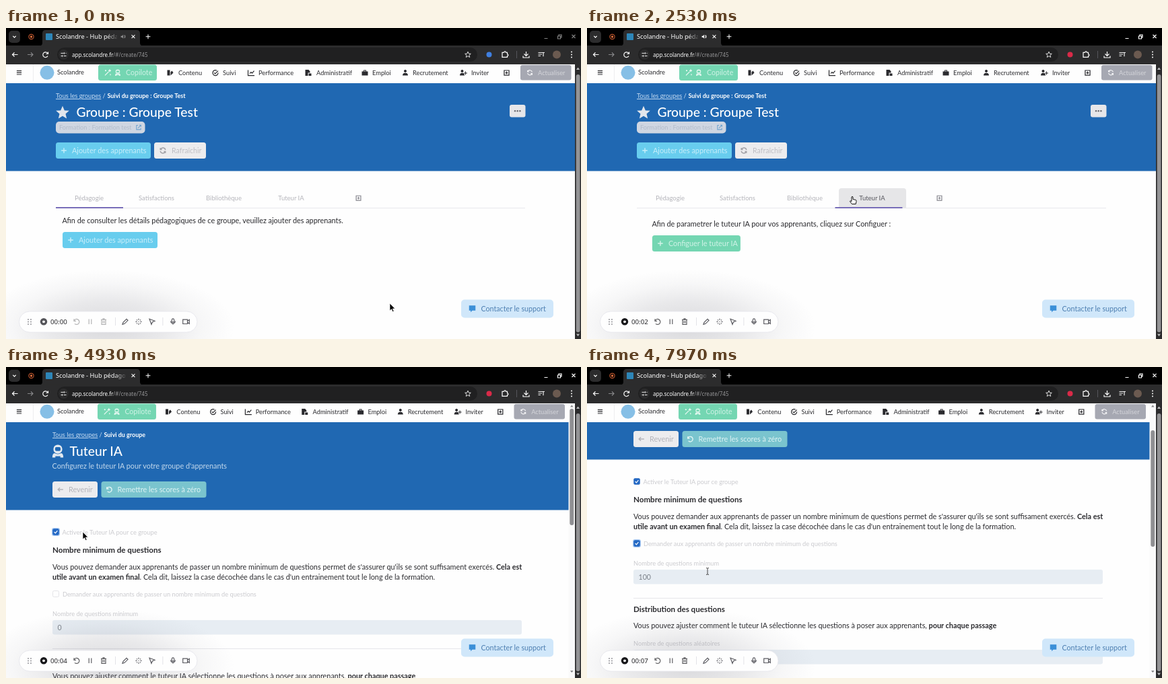
An HTML page for the animation above (8 s loop, 854 by 462 pixels).

```html
<!DOCTYPE html>
<html lang="fr">
<head>
<meta charset="utf-8">
<title>Tuteur IA</title>
<style>
html, body { margin: 0; width: 100%; height: 100%; overflow: hidden; background: #fefefe; }
svg { display: block; width: 100%; height: 100%; font-family: Lato, sans-serif; }
.ui { font-family: "Noto Sans", sans-serif; }
text { white-space: pre; }
.b { font-weight: 700; }
</style>
</head>
<body>
<svg id="stage" viewBox="0 0 854 462" preserveAspectRatio="none"></svg>
<script>
const LOOP = 8000;
const BRAND = 'Scolandre';
const INK = '#2a2a2e', BLUE = '#2068b2', PAGE = '#fefefe', DARK = '#2c2c2d';
const SKY = '#68cdee', GREEN = '#74d6b2', LIGHT = '#ececee', FAINT = '#cbcbcf', TAB = '#b4b4ba', TOOL = '#5a5a60';

// Icons are drawn around their own centre; a leading "!" means filled.
const ICONS = {
  plus: 'M-4 0H4M0-4V4',
  cross: 'M-2.7-2.7 2.7 2.7M2.7-2.7-2.7 2.7',
  check: 'M-4 0-1 3 4-3',
  back: 'M4 0H-4M-1-3-4 0-1 3',
  next: 'M-4 0H4M1-3 4 0 1 3',
  chevron: 'M-2-1 0 1 2-1',
  refresh: 'M4-1A4 4 0 0 0-3.5-2M-4-4v2.5h2.5M-4 1A4 4 0 0 0 3.5 2M4 4V1.5H1.5',
  undo: 'M-4-1A4 4 0 1 1-3 3M-4-4V-1H-1',
  reload: 'M3.7-1A3.8 3.8 0 1 0 3.5 2M4-4V-1H1',
  menu: 'M-4-3H4M-4 0H4M-4 3H4',
  tune: 'M-4-2H0M3-2H4M-4 2H-3M0 2H4M1-3.3v2.6M-2 .7v2.6',
  user: '!M0-4.5a2 2 0 1 1-.01 0M-4 4a4 3.8 0 0 1 8 0z',
  adduser: '!M-1.5-4.5a2 2 0 1 1-.01 0M-5 4a3.5 3.8 0 0 1 7 0zM3-2h1v2h2v1H4v2H3V1H1V0h2z',
  chart: 'M-4.5-4V4H5M-2 1 0-1 1.5.5 4.5-3',
  brief: '!M-4.5-2H-2V-4H2V-2H4.5V4H-4.5zM-1-2H1V-3H-1z',
  layers: '!M-4-4H0V4H-4zM1-1 3-3 5 0 1 4z',
  doc: '!M-4-4.5H1L3-2V0H0V4.5H-4zM1 1H5V4.5H1z',
  square: 'M-3.6-3.6h7.2v7.2h-7.2zM0-2V2M-2 0H2',
  tick: 'M4 0A4 4 0 1 1 2-3.4M-2-.3-.3 1.4 4-3',
  puzzle: 'M-4-3h2.6a1.4 1.4 0 0 1 2.8 0H3.5V-.5a1.4 1.4 0 0 1 0 2.8V4H-4z',
  down: 'M0-4.5V1.5M-3-1 0 2 3-1M-4.5 2v2.5h9V2',
  list: 'M-4.5-3H3M-4.5-.5H1M-4.5 2H-1M3 2.8V-3H5',
  star: 'M0-4.8 1.4-1.5 4.8-1.3 2.2 1 3 4.4 0 2.5-3 4.4-2.2 1-4.8-1.3-1.4-1.5Z',
  wand: 'M-4 4 1.5-1.5M3-5V-1M1-3H5M-3-4v2M-4-3h2M4 2v2',
  robot: '!M0-5.2A3.6 3.6 0 0 1 0 2A3.6 3.6 0 0 1 0-5.2M-1.2-3.2a1 1 0 0 0-1 1v1a1 1 0 0 0 1 1H1.2a1 1 0 0 0 1-1v-1a1 1 0 0 0-1-1zM-4.4 5.2Q-4.4 1.6-2.6 1.6Q0 3.2 2.6 1.6Q4.4 1.6 4.4 5.2H2V4H-2V5.2z',
  link: 'M-1-3.5h-2.5v7h7V1M1-3.8h2.8V-1M3.8-3.8-1 1',
  pause: 'M-1.8-3.7V3.7M1.8-3.7V3.7',
  trash: 'M-4-3H4M-3-3V4H3V-3M-1-3V-4.5H1V-3M-1-1V2M1-1V2',
  pen: 'M-4 4-3 1 2-4 4-2-1 3Z',
  spark: 'M0-4.5v2M0 4.5v-2M-4.5 0h2M4.5 0h-2M-3-3l1 1M3-3 2-2M-3 3l1-1M3 3 2 2M-.5 0h1',
  pointer: 'M-4-4 4-1 .5.5-1 4Z',
  mic: 'M0-4.5a1.6 1.6 0 0 0-1.6 1.6v2a1.6 1.6 0 0 0 3.2 0v-2A1.6 1.6 0 0 0 0-4.5M-3.3-1a3.3 3.3 0 0 0 6.6 0M0 2.5V4.5',
  cam: 'M-4.8-3.2H2V3.2H-4.8zM2-1 4.8-3V3L2 1',
  sound: '!M-4-1.3H-2L.3-3.5V3.5L-2 1.3H-4zM1.8-2.2 3-3Q5 0 3 3L1.8 2.2Q3 0 1.8-2.2',
  chat: '!M-5-5H5V3H0L-2.5 5.5V3H-5z'
};

const text = (x, y, s, size = 10.85, fill = INK, more = '') =>
  `<text x="${x}" y="${y}" font-size="${size}" fill="${fill}" ${more}>${s}</text>`;
const rect = (x, y, w, h, fill, r = 0, more = '') =>
  `<rect x="${x}" y="${y}" width="${w}" height="${h}" rx="${r}" fill="${fill}" ${more}/>`;
const dot = (x, y, r, fill, more = '') => `<circle cx="${x}" cy="${y}" r="${r}" fill="${fill}" ${more}/>`;
const icon = (name, x, y, color = INK, scale = 1, width = 1.2) => {
  const solid = ICONS[name][0] === '!', d = ICONS[name].replace('!', '');
  const paint = solid ? `fill="${color}" fill-rule="evenodd"` : `fill="none" stroke="${color}" stroke-width="${width}"`;
  return `<path transform="translate(${x} ${y}) scale(${scale})" d="${d}" ${paint}/>`;
};
const group = (id, body) => `<g id="${id}">${body}</g>`;
const button = (x, y, w, fill, ic, label, color, size) =>
  rect(x, y, w, 24, fill, 3.5) + icon(ic, x + 12, y + 12, color, .95, 1.5) +
  text(x + 24, y + 15.8, label, size, color);
const bold = s => `<tspan class="b">${s}</tspan>`;

function browserBar() {
  return rect(0, 0, 854, 27, '#000') + rect(0, 26, 854, 28, DARK) +
    rect(4, 4, 17, 18, DARK, 5) + icon('chevron', 12.5, 13, '#fff', 1.1) +
    dot(37.5, 13, 3.6, 'none', 'stroke="#b5522c" stroke-width="1.2"') + dot(37.5, 13, 1.7, '#dd6f3c') +
    `<path d="M50 26.5Q54 26 54 22V8Q54 3 59 3H194Q199 3 199 8V22Q199 26 203 26.5Z" fill="${DARK}"/>` +
    rect(59, 8, 10, 10, '#2e86b8', 1) +
    `<g clip-path="url(#tabClip)" class="ui">${text(74, 16.3, BRAND + ' - Hub pédagogique', 9.2, 'url(#tabFade)')}</g>` +
    group('sound', icon('sound', 174, 12.8, '#fff', .85)) +
    icon('cross', 189, 12.8, '#fff', .9) + icon('plus', 211, 12.8, '#fff', .85) +
    group('win', '<path d="M799.5 15.5h5M819.5 12h4v4h-4zM821 12v-2h4v4h-1.5M840.5 10l5 5M845.5 10l-5 5" fill="none" stroke="#fff" stroke-width="1.2"/>') +
    icon('back', 13.5, 39.5, '#fff') + icon('next', 36, 39.5, '#858587') + icon('reload', 58.5, 39.5, '#fff') +
    rect(76, 29, 624, 21, '#202021', 10.5) + dot(85.5, 39.5, 7.5, DARK) + icon('tune', 85.5, 39.5, '#e6e6e6') +
    `<g class="ui">${text(98, 42.7, `app.${BRAND.toLowerCase()}.fr<tspan fill="#949496">/#/create/745</tspan>`, 8, '#fff')}</g>` +
    icon('star', 686, 39.5, '#eee', .9, 1) + dot(717.5, 39.5, 4, '#d92a48', 'id="rec"') +
    icon('puzzle', 741, 39.3, '#fff') + rect(758, 34, 1, 11, '#55565c') +
    icon('down', 772.5, 39.5, '#fff') + icon('list', 795, 39.5, '#eee') + dot(818, 39.5, 6, '#6b5a50') +
    [35.5, 39.5, 43.5].map(y => dot(840, y, 1, '#fff')).join('');
}

function nav(id, squeeze, width) {
  const at = x => x - squeeze * (x - 60) / 74;
  const items = [['layers', 243.5, 256, 'Contenu'], ['tick', 311, 322, 'Suivi'], ['chart', 364, 375, 'Performance'],
    ['doc', 448.5, 461, 'Administratif'], ['brief', 533, 544, 'Emploi'], ['user', 593, 604, 'Recrutement'],
    ['adduser', 679, 691, 'Inviter']];
  return group(id, rect(0, 54, width, 28, PAGE) + icon('menu', 19.5, 66.3, INK, .9, 1.3) +
    rect(40, 54, 1, 25, '#ededf0') + dot(61, 66.3, 10.5, '#86bfe6') + text(76, 69, BRAND, 9.3) +
    rect(at(137), 54.5, 87, 23.5, GREEN, 3.5) + icon('wand', at(151), 66.3, '#f0fbf7') +
    icon('robot', at(166), 66.3, '#e0f6ee', .9) + text(at(178), 70, 'Copilote', 10.6, '#cff2e6') +
    items.map(([ic, x, tx, label]) => icon(ic, at(x), 66.6, INK) + text(at(tx), 69.8, label, 9.3)).join('') +
    icon('square', at(743.5), 66.6, INK) +
    rect(at(764), 55, 75.5, 22.5, '#a6a8b2', 3) + icon('refresh', at(778), 66.3, '#f4f4f6', .85, 1.4) +
    text(at(790), 69.8, 'Actualiser', 9.3, '#d4d5da'));
}

const crumbs = s => text(74, 104, 'Tous les groupes', 9.3, '#c6dcf2', 'text-decoration="underline"') +
  text(143.5, 104, '/', 9.3, '#dce8f4') + text(150.5, 104, s, 8.95, '#fff', 'class="b"');

function groupPage() {
  const tabs = ['Pédagogie', 'Satisfactions', 'Bibliothèque', 'Tuteur IA'];
  return group('groupPage', rect(0, 82, 845, 130.5, BLUE) + crumbs('Suivi du groupe : Groupe Test') +
    `<path transform="translate(84 125.5) scale(2.05)" d="${ICONS.star}" fill="#e2e6ec"/>` +
    text(104.5, 132, 'Groupe : Groupe Test', 19.3, '#fff', 'font-weight="500"') +
    rect(748, 114, 23.5, 18.5, '#e6e6e9', 3) + [756, 759.7, 763.4].map(x => dot(x, 123.3, 1.2, '#68686e')).join('') +
    rect(74, 139, 132.5, 17.5, '#cfd6e2', 5) + text(79, 151, 'Formation : Formation test', 9.2, '#b2bccb') +
    icon('link', 197, 147.7, '#6fa3cf', .9) +
    button(74, 170, 141, SKY, 'plus', 'Ajouter des apprenants', '#c9eefa') +
    rect(220, 170, 77, 24, LIGHT, 3.5) + icon('refresh', 233, 182, '#a0a0a6', .95, 1.5) +
    text(246, 185.8, 'Rafraîchir', 10.6, '#bebec4') +
    rect(74, 267, 697, 1, '#e8e8ec') +
    '<path id="hover" d="M374 267V242Q374 238 378 238H470Q474 238 474 242V267Z" fill="#e6e6e8"/>' +
    tabs.map((s, i) => text(123.5 + 100 * i, 256, s, 9.5, TAB, `id="tab${i}" text-anchor="middle"`)).join('') +
    icon('square', 523.5, 252.7, '#84848c', .95) +
    rect(74, 266, 100, 1.8, '#6d62b4', 0, 'id="inkbar"') +
    `<g clip-path="url(#paneClip)">` +
    group('pane0', text(83.5, 289.6, 'Afin de consulter les détails pédagogiques de ce groupe, veuillez ajouter des apprenants.') +
      button(84, 303, 141, SKY, 'plus', 'Ajouter des apprenants', '#c9eefa')) +
    group('pane1', text(83.5, 294.6, 'Afin de parametrer le tuteur IA pour vos apprenants, cliquez sur Configuer :') +
      button(84, 308, 131, GREEN, 'plus', 'Configuer le tuteur IA', '#d2f3e8')) + '</g>');
}

const checkbox = (id, x, y) => rect(x + .5, y + .5, 9, 9, '#fefefe', 2, 'stroke="#e4e4e8"') +
  group(id, rect(x - 1, y - 1, 12, 12, '#a9c9f2', 3, `id="${id}Ring"`) + rect(x + .3, y + .3, 9.4, 9.4, '#2368c4', 2) +
    icon('check', x + 5, y + 5, '#fff', .6, 2));
const label = (x, y, s) => text(x, y, s, 9.25, FAINT);
const field = y => rect(74, y, 697, 21.5, '#e7edf3', 3);

function tutorPage() {
  const form = text(74, 276.3, 'Nombre minimum de questions', 11.6, INK, 'class="b"') +
    text(74, 301, `Vous pouvez demander aux apprenants de passer un nombre minimum de questions permet de s'assurer qu'ils se sont suffisament exercés. ${bold('Cela est')}`) +
    text(74, 316, `${bold('utile avant un examen final')}. Cela dit, laissez la case décochée dans le cas d'un entrainement tout le long de la formation.`) +
    checkbox('check2', 74, 332) + label(89, 341, 'Demander aux apprenants de passer un nombre minimum de questions') +
    label(74, 369.5, 'Nombre de questions minimum') + field(376) + text(81.5, 391, '0', 10.6, '#7c828a', 'id="minimum"') +
    rect(74, 418, 697, 1, '#e6e6ea') +
    text(74, 439.4, 'Distribution des questions', 11.6, INK, 'class="b"') +
    text(74, 463.3, `Vous pouvez ajuster comment le tuteur IA sélectionne les questions à poser aux apprenants, ${bold('pour chaque passage')}`) +
    label(74, 489, 'Nombre de questions aléatoires') + field(495);
  return group('tutorPage', rect(0, 82, 845, 130.5, BLUE) +
    group('column', crumbs('Suivi du groupe') + icon('robot', 82, 125, '#e2e9f0', 1.85) +
      text(99.5, 132, 'Tuteur IA', 19.3, '#fff', 'font-weight="500"') +
      text(73.5, 150.6, "Configurez le tuteur IA pour votre groupe d'apprenants", 10.85, '#c2d8ec') +
      button(74, 170, 67, LIGHT, 'back', 'Revenir', '#b4b4ba') +
      button(146.5, 170, 156, '#7ac4ce', 'undo', 'Remettre les scores à zéro', '#e0f3f4') +
      checkbox('check1', 74, 240) + label(88.5, 249, 'Activer le Tuteur IA pour ce groupe') +
      group('save', button(74, 265.5, 79, SKY, 'check', 'Enregistrer', '#c9eefa', 9.8)) + group('form', form)));
}

const overlays = () =>
  group('innerBar', rect(835.5, 54, 9.5, 408, '#fafafa') + rect(837.3, 62, 6, 173, '#8f8f92', 3, 'id="thumb"') +
    '<path d="M838 59.5l2.3-3 2.3 3zM838 451l2.3 3 2.3-3z" fill="#858588"/>') +
  rect(845, 54, 9, 408, DARK) + rect(846.7, 69, 5.8, 383, '#949496', 3) +
  '<path d="M847 62l2.5-3.5 2.5 3.5zM847 454.5l2.5 3.5 2.5-3.5z" fill="#bcbcbe"/>' +
  '<ellipse cx="150" cy="444" rx="190" ry="85" fill="url(#glow)"/>' +
  rect(676, 403.5, 137, 27, '#d0e7fa', 5) + icon('chat', 692.5, 417, '#3b8fd8', .95) +
  text(705.5, 420.8, 'Contacter le support', 10.7, '#4f80b2') +
  rect(19.5, 421, 264.5, 31, '#fefefe', 15.5, 'stroke="#e4e4ea" stroke-width=".8"') +
  [33, 37].map(x => [433, 436.5, 440].map(y => dot(x, y, .9, '#8a8a90')).join('')).join('') +
  dot(56, 436.3, 5.2, '#17171a', 'id="recBtn"') + dot(56, 436.3, 1.9, '#fff') +
  `<g class="ui">${text(66, 440, '00:00', 9.7, '#222226', 'id="timer" font-weight="500"')}</g>` +
  group('controls', icon('undo', 105, 436.3) + icon('pause', 125, 436.3) + icon('trash', 145, 436.3)) +
  rect(162, 430, .8, 12, '#dcdce2') + icon('pen', 177, 436.3, TOOL) + icon('spark', 197, 436.3, TOOL) +
  icon('pointer', 217, 436.3, TOOL) + rect(232.5, 430, .8, 12, '#dcdce2') +
  icon('mic', 248, 436.3, TOOL) + icon('cam', 267.5, 436.3, TOOL);

const cursors = () => group('cursor',
  group('arrow', '<path d="M0 0V11L2.6 8.7 4.3 12.6 6.1 11.8 4.4 8H7.8Z" fill="#000" stroke="#fff" stroke-width=".7"/>') +
  group('hand', '<path d="M-1 1Q0-.5 1 1V4.5L5 5.3Q6.3 5.7 6 7.5L5.2 11.5H-.5L-3.6 7.5Q-3.8 6-1 7.5Z" fill="#fff" stroke="#111" stroke-width="1"/>') +
  group('beam', '<path d="M-2-4.5Q0-4.5 0-3.5Q0-4.5 2-4.5M0-3.5V4.5M-2 5.5Q0 5.5 0 4.5Q0 5.5 2 5.5" fill="none" stroke="#333" stroke-width=".9"/>'));

const defs = `<defs>
  <clipPath id="tabClip"><rect id="tabRoom" x="74" y="4" width="91" height="20"/></clipPath>
  <clipPath id="paneClip"><rect x="74" y="268" width="697" height="80"/></clipPath>
  <linearGradient id="tabFade" gradientUnits="userSpaceOnUse" x1="150" x2="165"><stop stop-color="#fff"/><stop offset="1" stop-color="#fff" stop-opacity=".15"/></linearGradient>
  <radialGradient id="glow"><stop stop-color="#70707c" stop-opacity=".26"/><stop offset=".45" stop-color="#70707c" stop-opacity=".15"/><stop offset=".75" stop-color="#70707c" stop-opacity=".05"/><stop offset="1" stop-color="#70707c" stop-opacity="0"/></radialGradient>
</defs>`;

document.getElementById('stage').innerHTML = defs + rect(0, 0, 854, 462, PAGE) + groupPage() + tutorPage() +
  nav('navWide', 0, 845) + nav('navTight', 1, 836) + overlays() + browserBar() + cursors();

const $ = id => document.getElementById(id);
const set = (id, name, value) => $(id).setAttribute(name, value);
const show = (id, on) => set(id, 'display', on ? 'inline' : 'none');
const move = (id, x, y = 0) => set(id, 'transform', `translate(${x} ${y})`);
const progress = (t, start, length) => Math.min(1, Math.max(0, (t - start) / length));
const inOut = u => u < .5 ? 4 * u ** 3 : 1 - (2 - 2 * u) ** 3 / 2;
const smooth = u => u * u * (3 - 2 * u);

const AT = { record: 860, tab: 2281, open: 3280, enable: 4700, scroll: 6780, minimum: 7350 };
const PATH = [[0, 570, 409], [450, 570, 409], [1170, 267, 370], [1450, 267, 370], [2080, 394, 250], [2540, 394, 250],
  [2900, 160, 317], [4060, 160, 317], [4550, 114, 245], [5250, 114, 245], [6000, 234, 301], [6600, 234, 301],
  [7150, 179, 262], [7500, 179, 262], [7850, 179, 303], [LOOP, 179, 303]];
const SHAPES = [[0, 'arrow'], [1900, 'hand'], [2610, 'arrow'], [2800, 'hand'], [4090, 'arrow'], [5650, 'beam'],
  [7050, 'arrow'], [7650, 'beam']];

function pointerAt(t) {
  const i = PATH.findIndex((p, k) => k && t <= p[0]);
  const [t0, x0, y0] = PATH[i - 1], [t1, x1, y1] = PATH[i];
  const e = smooth((t - t0) / (t1 - t0));
  return [x0 + (x1 - x0) * e, y0 + (y1 - y0) * e];
}

function render(t) {
  const [x, y] = pointerAt(t);
  const shape = SHAPES.filter(s => s[0] <= t).pop()[1];
  const recording = t >= AT.record, opened = t >= AT.open, enabled = t >= AT.enable, limited = t >= AT.minimum;
  const focus = progress(t, AT.record, 150);

  move('cursor', x, y);
  for (const s of ['arrow', 'hand', 'beam']) show(s, s === shape);

  set('win', 'opacity', .5 + .5 * focus);
  set('sound', 'opacity', .45 + .55 * focus);
  set('rec', 'fill', recording ? '#d92a48' : '#3f7fe0');
  set('recBtn', 'fill', recording ? '#17171a' : '#55555a');
  set('controls', 'opacity', .35 + .4 * focus);
  $('timer').textContent = '00:0' + Math.floor(t / 1000);

  show('sound', !opened);
  set('tabRoom', 'width', opened ? 103 : 91);
  set('tabFade', 'x1', opened ? 162 : 150);
  set('tabFade', 'x2', opened ? 177 : 165);

  const slide = inOut(progress(t, AT.tab, 300));
  const hover = x > 374 && x < 474 && y > 238 && y < 267;
  show('groupPage', !opened);
  show('hover', hover);
  set('tab3', 'fill', hover ? '#55555c' : TAB);
  set('inkbar', 'x', 74 + 300 * slide);
  move('pane0', -697 * slide);
  move('pane1', 697 * (1 - slide));

  const scroll = 75 * smooth(progress(t, AT.scroll, 200));
  show('tutorPage', opened);
  move('tutorPage', 0, -scroll);
  move('column', enabled ? -5 : 0);
  show('check1', enabled);
  show('check1Ring', !limited);
  show('save', !enabled);
  show('form', enabled);
  show('check2', limited);
  $('minimum').textContent = limited ? '100' : '0';
  show('innerBar', enabled);
  set('thumb', 'y', 62 + scroll * 32 / 75);
  show('navWide', !enabled);
  show('navTight', enabled);
}

const start = performance.now();
function tick() {
  render((performance.now() - start) % LOOP);
  requestAnimationFrame(tick);
}
tick();
</script>
</body>
</html>
```
